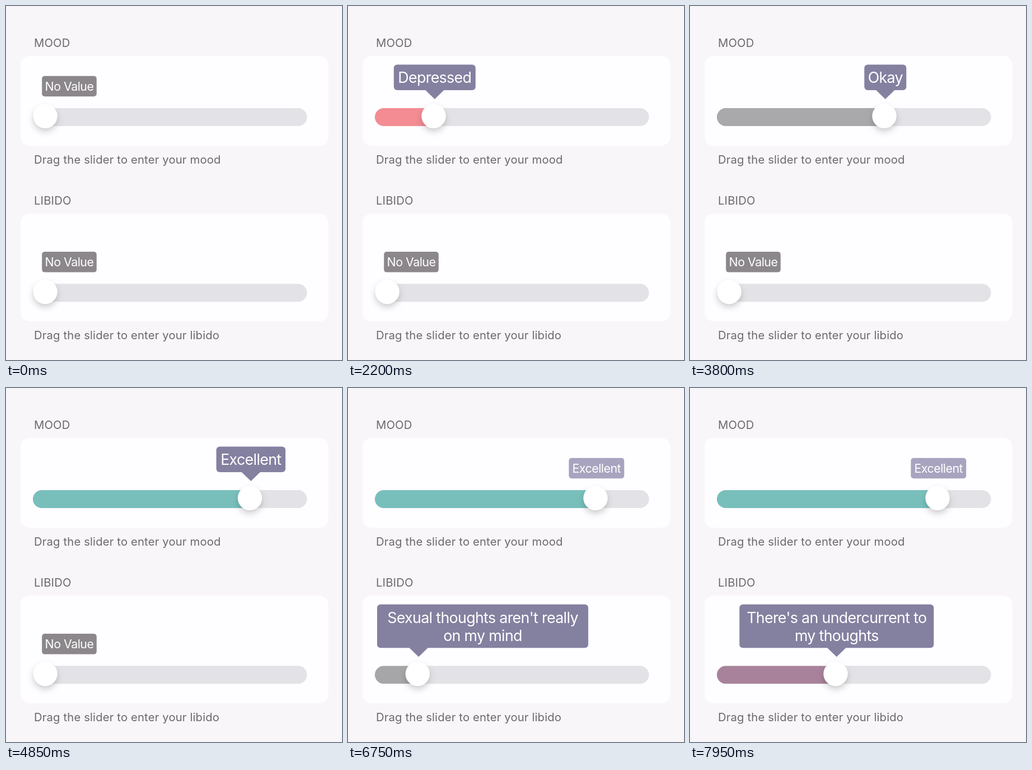
These frames come from a looping animation (600 px wide and 631 px high, 8 s). An HTML page:

```html
<!DOCTYPE html>
<html lang="en">
<head>
<meta charset="utf-8">
<title>Mood sliders</title>
<style>
  html, body { margin: 0; width: 100%; height: 100%; overflow: hidden; background: #f9f6fa; }
  svg { display: block; width: 100%; height: 100%; }
  text { font-family: Inter, "Liberation Sans", sans-serif; font-optical-sizing: none; }
  .note { font-size: 20.3px; letter-spacing: 0.14px; fill: #6b6a6e; }
  .label { font-size: 26.8px; letter-spacing: -0.025em; fill: #fff; text-anchor: middle; }
</style>
</head>
<body>
<svg id="stage" viewBox="0 0 600 631">
  <defs>
    <filter id="shadow" x="-60%" y="-60%" width="220%" height="240%">
      <feDropShadow dx="0" dy="6" stdDeviation="6" flood-color="#000" flood-opacity="0.18"/>
      <feDropShadow dx="0" dy="0.5" stdDeviation="0.8" flood-color="#000" flood-opacity="0.06"/>
    </filter>
  </defs>
</svg>
<script>
const LOOP = 8000, STEP = 50;
const TRACK = { left: 48, right: 537.5, height: 32 };
const MIN_X = 70, MAX_X = 515, BUBBLE_LEFT = 52, FADE = 200;
const GREY = [139, 135, 138], PURPLE = [132, 128, 160], PALE = [168, 164, 191];
const UNSET = { lines: ["No Value"], width: 122 };

const stage = document.getElementById("stage");

function add(parent, name, attrs = {}, text = "") {
  const node = document.createElementNS("http://www.w3.org/2000/svg", name);
  set(node, attrs);
  node.textContent = text;
  return parent.appendChild(node);
}

function set(node, attrs) {
  for (const key in attrs) node.setAttribute(key, attrs[key]);
}

const clamp = v => Math.min(1, Math.max(0, v));
const smooth = v => v * v * (3 - 2 * v);
const mix = (a, b, k) => a + (b - a) * k;
const mixColor = (a, b, k) => a.map((v, i) => mix(v, b[i], k));
const rgb = c => `rgb(${c.map(Math.round)})`;
const level = (width, color, ...lines) => ({ width, color, lines });

// Thumb position on a piecewise linear drag path of [time, x] points.
function positionAt(path, t) {
  if (t <= path[0][0]) return path[0][1];
  for (let i = 1; i < path.length; i++) {
    const [t0, x0] = path[i - 1], [t1, x1] = path[i];
    if (t <= t1) return mix(x0, x1, (t - t0) / (t1 - t0));
  }
  return path[path.length - 1][1];
}

function levelIndex(x, count) {
  return Math.min(count - 1, Math.floor((x - MIN_X) / (MAX_X - MIN_X) * count));
}

class Slider {
  constructor({ title, hint, cardY, cardHeight, trackY, path, press, release, levels }) {
    Object.assign(this, { trackY, path, press, release, levels });
    add(stage, "text", { class: "note", x: 50, y: cardY - 16 }, title);
    add(stage, "rect", { x: 26, y: cardY, width: 549.5, height: cardHeight, rx: 16, fill: "#fefdff" });
    add(stage, "text", { class: "note", x: 50, y: cardY + cardHeight + 32 }, hint);

    const bar = { x: TRACK.left, y: trackY, height: TRACK.height };
    const clip = add(stage, "clipPath", { id: "clip" + trackY });
    const shape = { ...bar, width: TRACK.right - TRACK.left, rx: TRACK.height / 2 };
    add(clip, "rect", shape);
    add(stage, "rect", { ...shape, fill: "#e3e2e6" });
    this.fill = add(stage, "rect", { ...bar, "clip-path": `url(#${clip.id})` });
    this.thumb = add(stage, "circle", { cy: trackY + 14.2, r: 21.7, fill: "#fff", filter: "url(#shadow)" });

    this.arrow = add(stage, "path");
    this.bubble = add(stage, "g");
    this.box = add(this.bubble, "rect", { rx: 6 });
    this.lines = [0, 1].map(() => add(this.bubble, "text", { class: "label" }));
  }

  fillColor(t, x) {
    const { levels, path } = this;
    const now = levelIndex(x, levels.length);
    if (!now) return levels[0].color;
    let start = t;
    while (start > t - FADE && levelIndex(positionAt(path, start), levels.length) === now) start -= 5;
    return mixColor(levels[now - 1].color, levels[now].color, clamp((t - start) / FADE));
  }

  update(t) {
    const x = positionAt(this.path, t);
    const touched = t > this.press;
    const label = touched ? this.levels[levelIndex(x, this.levels.length)] : UNSET;
    const active = smooth(clamp((t - this.press) / 350)) - smooth(clamp((t - this.release) / 400));

    set(this.thumb, { cx: x });
    set(this.fill, { width: x - TRACK.left, fill: rgb(this.fillColor(t, x)), opacity: touched ? 1 : 0 });

    const { lines, width } = label;
    const height = 45.6 + 32 * (lines.length - 1);
    const tipX = x + 1.8;
    const scale = mix(0.8, 1, active);
    const centerX = Math.max(BUBBLE_LEFT + width / 2, tipX);
    const centerY = this.trackY - 32 - height / 2 + mix(15.8, 0, active);
    const bottom = centerY + height / 2 * scale;
    const color = rgb(mixColor(t > this.release ? PALE : GREY, PURPLE, active));

    set(this.bubble, { transform: `translate(${centerX} ${centerY}) scale(${scale})` });
    set(this.box, { x: -width / 2, y: -height / 2, width, height, fill: color });
    this.lines.forEach((node, i) => {
      node.textContent = lines[i] || "";
      set(node, { y: 10 - 16 * (lines.length - 1) + 32 * i });
    });
    const half = 17 * active;
    set(this.arrow, {
      d: `M${tipX - half} ${bottom - 0.5}h${2 * half}L${tipX} ${bottom + 16 * active}z`,
      fill: color,
      opacity: active > 0.01 ? 1 : 0
    });
  }
}

const TEAL = [120, 191, 188], RED = [243, 140, 147], ASH = [169, 168, 170];

const sliders = [
  new Slider({
    title: "MOOD", hint: "Drag the slider to enter your mood",
    cardY: 89, cardHeight: 160, trackY: 182,
    press: 1450, release: 5500,
    path: [[1450, 70], [2200, 153], [3800, 347], [4000, 368.5], [4400, 410], [4600, 427], [4850, 435.5], [5250, 442]],
    levels: [
      level(146, RED, "Depressed"),
      level(64, [205, 154, 158], "Sad"),
      level(69, ASH, "Meh"),
      level(75, ASH, "Okay"),
      level(123.5, TEAL, "Excellent")
    ]
  }),
  new Slider({
    title: "LIBIDO", hint: "Drag the slider to enter your libido",
    cardY: 370, cardHeight: 192, trackY: 495.3,
    press: 6250, release: Infinity,
    path: [[6250, 70], [7300, 184], [7950, 260], [8000, 266]],
    levels: [
      level(377, [166, 165, 167], "Sexual thoughts aren't really", "on my mind"),
      level(335, [166, 165, 167], "I may have the occasional", "thirsty thought"),
      level(347, [169, 98, 144], "There's an undercurrent to", "my thoughts"),
      level(347, [190, 90, 140], "My thoughts keep drifting", "that way"),
      level(347, [210, 80, 130], "I can hardly think about", "anything else")
    ]
  })
];

const begin = performance.now();
function frame() {
  const t = (performance.now() - begin) % LOOP;
  const tick = Math.floor(t / STEP) * STEP;
  sliders.forEach(slider => slider.update(tick));
  requestAnimationFrame(frame);
}
frame();
</script>
</body>
</html>
```
